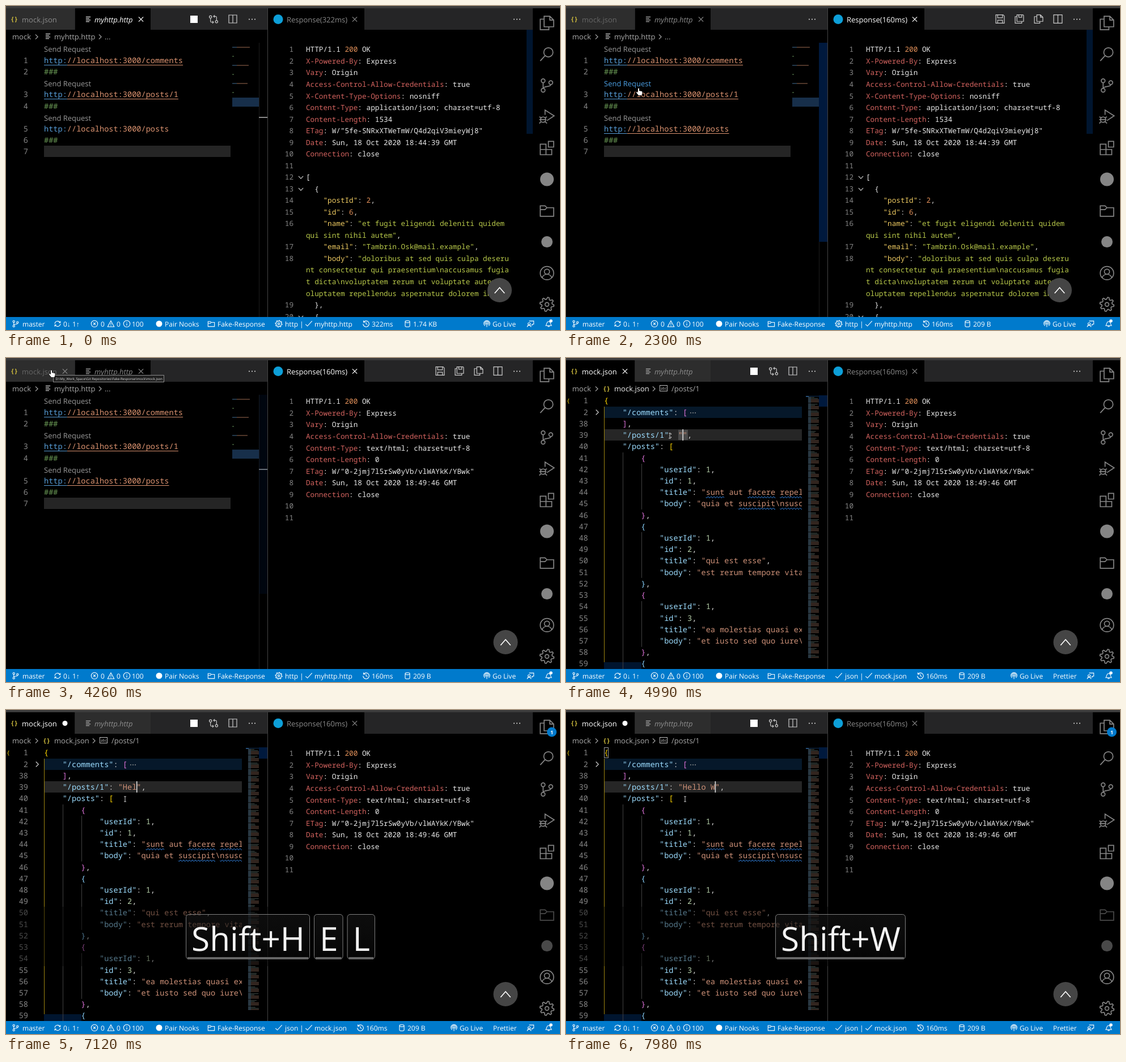
These frames come from a looping animation (977x573 px, 8 s). An HTML page with a canvas:

```html
<!DOCTYPE html>
<html lang="en">
<head>
<meta charset="utf-8">
<title>Mock server editor</title>
<style>
html, body { margin: 0; width: 100%; height: 100%; overflow: hidden; background: #000; }
canvas { display: block; }
</style>
</head>
<body>
<canvas id="stage" width="977" height="573"></canvas>
<script>
const ctx = document.getElementById('stage').getContext('2d');
const LOOP = 8000;
const UI = '"Open Sans", "Noto Sans", sans-serif';
const MONO = '"Noto Sans Mono", "DejaVu Sans Mono", monospace';
const LEFT = `13.62px ${MONO}`, RIGHT = `12.7px ${MONO}`;
const COL = 8.17, ROW = 20.22;
const T = { waiting: 1840, answered: 2260, shown: 2930, tip: 4180, opened: 4420, caret: 4880 };

const circle = (x, y, r) => `M${x - r} ${y}a${r} ${r} 0 1 0 ${2 * r} 0a${r} ${r} 0 1 0 ${-2 * r} 0`;
const gearPath = () => {
  let d = circle(8, 8, 2);
  for (let i = 0; i < 32; i++) {
    const a = (i + 0.5) * Math.PI / 16, r = i % 4 < 2 ? 7.4 : 5.4;
    d += `${i ? 'L' : 'M'}${8 + r * Math.cos(a)} ${8 + r * Math.sin(a)}`;
  }
  return d + 'Z';
};

// Outlines on a 16 x 16 grid
const ICONS = {
  files: 'M5 1h6l4 4v7H5zM11 1v4h4M5 4H1v11h9v-3',
  search: circle(9.5, 6, 4.8) + 'M6 9.5L1 15',
  branch: circle(4, 3, 2) + circle(4, 13, 2) + circle(12, 5, 2) + 'M4 5v6M12 7c0 3-7 1-8 4',
  debug: 'M6 6V1l9.5 6L8 12' + circle(4, 11, 2.8) + 'M0 8l2 1M0 11h7M0 15l2-2M8 8l-2 1M8 15l-2-2',
  blocks: 'M1 4h6v11H1zM1 9.5h12V15H1M9.5 1H15v6H9.5z',
  folder: 'M1 3h5l2 2h7v9H1zM1 7h5l2-2',
  person: circle(8, 8, 7) + circle(8, 6.5, 2.7) + 'M3 13c1-5 9-5 10 0',
  gear: gearPath(),
  sync: 'M2 8a6 6 0 0 1 11-3M14 8a6 6 0 0 1-11 3M14 2v3.5h-3.5M2 14v-3.5h3.5',
  error: circle(8, 8, 7) + 'M5.5 5.5l5 5M10.5 5.5l-5 5',
  warn: 'M8 1.5l7 13H1zM8 6v4M8 11.5v1.5',
  info: circle(8, 8, 7) + 'M8 7v5M8 4v1.5',
  check: 'M1 9l4 4 10-11',
  history: 'M3 4a6.5 6.5 0 1 1-1.5 4M2.5 1v3.5H6M8 4.5V8l3 2',
  store: 'M3 3.5v9c0 3 10 3 10 0v-9M3 3.5c0 3 10 3 10 0c0-3-10-3-10 0',
  cast: circle(8, 7, 1.5) + 'M8 9v6M4 12.5a6.5 6.5 0 1 1 8 0M5.5 10a4 4 0 1 1 5 0',
  feedback: circle(5, 8, 2.5) + 'M1 15c0-5 8-5 8 0M5 2h10v7h-2l-2 2V9',
  bell: 'M2 12c2-2 1-9 6-9s4 7 6 9zM6 12c0 3 4 3 4 0',
  split: 'M1 1h14v14H1zM8 1v14',
  save: 'M1 1h12l2 2v12H1zM4 1v5h8V1M4 15v-5h8v5',
  saveAll: 'M4 1h10l1 1v10H4zM7 1v4h5V1M4 4H1v11h11v-3',
  compare: circle(3, 4, 2) + circle(13, 12, 2) +
    'M3 6v5c0 2 1 2 5 2M6 11l2 2-2 2M13 10V5c0-2-1-2-5-2M10 1L8 3l2 2',
  lines: 'M2 2h12M2 6h9M2 10h12M2 14h9',
  close: 'M2 2l12 12M14 2L2 14',
  right: 'M5 2l6 6-6 6',
  down: 'M2 5l6 6 6-6',
  up: 'M1 12l7-8 7 8'
};
for (const name in ICONS) ICONS[name] = new Path2D(ICONS[name]);

const HAND = new Path2D('M-1-4q1-1 2 0v4l5 1q1 1 0 5l-1 2h-5l-4-5q0-2 3 0z');
const ARROW = new Path2D('M0 0v13l3-3 2 5 2-1-2-5h4z');
const BEAM = new Path2D('M-2-5h4M0-5V4M-2 4h4');

const clamp = v => Math.max(0, Math.min(1, v));

function rect(x, y, w, h, color) {
  ctx.fillStyle = color;
  ctx.fillRect(x, y, w, h);
}

function disc(x, y, r, color) {
  ctx.fillStyle = color;
  ctx.beginPath();
  ctx.arc(x, y, r, 0, 7);
  ctx.fill();
}

function text(s, x, y, color = '#fff', font = `13px ${UI}`, align = 'left') {
  ctx.font = font;
  ctx.fillStyle = color;
  ctx.textAlign = align;
  ctx.fillText(s, x, y);
  return ctx.measureText(s).width;
}

function icon(name, x, y, size, color = '#fff', weight = 1.2, turn = 0) {
  const k = size / 16;
  ctx.save();
  ctx.translate(x, y);
  ctx.rotate(turn);
  ctx.scale(k, k);
  ctx.translate(-8, -8);
  ctx.strokeStyle = color;
  ctx.lineWidth = weight / k;
  ctx.stroke(ICONS[name]);
  ctx.restore();
}

function dots(x, y, color = '#ccc', gap = 5, r = 1.1) {
  for (const i of [-1, 0, 1]) disc(x + i * gap, y, r, color);
}

function clipped(x, y, w, h, draw) {
  ctx.save();
  ctx.beginPath();
  ctx.rect(x, y, w, h);
  ctx.clip();
  draw();
  ctx.restore();
}

function runs(parts, x, y, font) {
  for (const [s, color] of parts) x += text(s, x, y, color, font);
}

function jsonParts(s, pal, bracket) {
  return [...s.matchAll(/"[^"]*"?|\d+|[{}\[\]]|[^"\d{}\[\]]+/g)].map(m => {
    const tok = m[0];
    if (tok[0] === '"') return [tok, s[m.index + tok.length] === ':' ? pal.key : pal.str];
    if (/\d/.test(tok)) return [tok, pal.num];
    return [tok, /[{}\[\]]/.test(tok) ? bracket : '#d4d4d4'];
  });
}

const BRIGHT = { key: '#f0cc62', str: '#b9ca4a', num: '#e3915a', head: '#d4635f', plain: '#eaeaea' };
const DARK = { key: '#9cdcfe', str: '#ce9178', num: '#b5cea8' };
const GOLD = '#ffd700', ORCHID = '#da70d6', SKY = '#87cefa';

const HEAD = ['X-Powered-By: Express', 'Vary: Origin', 'Access-Control-Allow-Credentials: true'];
const OLD_HEAD = [...HEAD, 'X-Content-Type-Options: nosniff', 'Content-Type: application/json; charset=utf-8',
  'Content-Length: 1534', 'ETag: W/"5fe-SNRxXTWeTmW/Q4d2qiV3mieyWj8"',
  'Date: Sun, 18 Oct 2020 18:44:39 GMT', 'Connection: close'];
const NEW_HEAD = [...HEAD, 'Content-Type: text/html; charset=utf-8', 'Content-Length: 0',
  'ETag: W/"0-2jmj7l5rSw0yVb/vlWAYkK/YBwk"', 'Date: Sun, 18 Oct 2020 18:49:46 GMT', 'Connection: close'];
// A leading ~ marks a wrapped string
const OLD_BODY = ['', '[', '  {', '    "postId": 2,', '    "id": 6,',
  '    "name": "et fugit eligendi deleniti quidem', '~qui sint nihil autem",',
  '    "email": "Tambrin.Osk@mail.example",',
  '    "body": "doloribus at sed quis culpa deseru',
  '~nt consectetur qui praesentium\\naccusamus fugia',
  '~t dicta\\nvoluptatem rerum ut voluptate autem v',
  '~oluptatem repellendus aspernatur dolorem in",', '  },', '  {'];

function response(fresh) {
  const y = i => Math.round(81.4 + 20.53 * i);
  const number = (n, i) => text(n, 507, y(i), '#858585', RIGHT, 'right');
  const head = fresh ? NEW_HEAD : OLD_HEAD;
  number(1, 0);
  runs([['HTTP/1.1 ', BRIGHT.plain], ['200', BRIGHT.num], [' OK', BRIGHT.plain]], 529, y(0), RIGHT);
  head.forEach((line, i) => {
    const cut = line.indexOf(':');
    number(i + 2, i + 1);
    runs([[line.slice(0, cut), BRIGHT.head], [line.slice(cut), BRIGHT.plain]], 529, y(i + 1), RIGHT);
  });
  let n = head.length + 2;
  (fresh ? ['', ''] : OLD_BODY).forEach((line, k) => {
    const i = head.length + 1 + k;
    if (line[0] === '~') {
      const comma = line.endsWith(',');
      runs([[line.slice(1, comma ? -1 : undefined), BRIGHT.str], [comma ? ',' : '', BRIGHT.plain]],
        529, y(i), RIGHT);
      return;
    }
    number(n++, i);
    runs(jsonParts(line, BRIGHT, BRIGHT.plain), 529, y(i), RIGHT);
    if (/[\[{]$/.test(line)) icon('down', 520, y(i) - 4, 11, '#ccc');
  });
  if (!fresh) rect(918, 42, 11, 184, '#00152f');
  const x = fresh ? 881 : 870.5;
  disc(x, 502.5, 21.5, '#454545');
  icon('up', x, 503, 20, '#fff', 1.6);
}

function record(id, title, body, color) {
  return [['        {', color], ['            "userId": 1,'], [`            "id": ${id},`],
    [`            "title": "${title}`], [`            "body": "${body}`], ['        },', color]];
}
const JSON_LINES = [['{', GOLD], ['    "/comments": [', ORCHID], ['    ],', ORCHID], null, ['    "/posts": [', GOLD],
  ...record(1, 'sunt aut facere repellat', 'quia et suscipit\\nsuscipit', ORCHID),
  ...record(2, 'qui est esse",', 'est rerum tempore vitae', SKY),
  ...record(3, 'ea molestias quasi exer', 'et iusto sed quo iure\\nvol', ORCHID),
  ['        {', SKY]];

function squiggle(col, len, row) {
  const x0 = 67 + col * COL, y = 84.5 + row * ROW;
  ctx.strokeStyle = '#3794ff';
  ctx.lineWidth = 1;
  ctx.beginPath();
  for (let x = 0; x < len * COL; x++) ctx.lineTo(x0 + x, y + Math.sin(x * 1.2) * 1.2);
  ctx.stroke();
}

function jsonMinimap() {
  const noise = n => { const v = Math.sin(n * 91.7) * 4375.5; return v - Math.floor(v); };
  for (let i = 0; i < 231; i++) {
    const y = 69 + i * 2, kind = i % 6;
    rect(427, y, 5, 1.3, kind === 5 ? '#26323a' : '#3f5666');
    if (kind < 5) rect(432, y, kind < 2 ? 6 + noise(i) * 8 : 14, 1.3, kind < 2 ? '#333c38' : '#4c382f');
  }
  rect(423, 67, 5, 2, '#264f78');
  rect(428, 67, 18, 1, '#0c2c52');
}

function jsonEditor(t, typed) {
  const base = i => Math.round(80.4 + i * ROW), top = i => Math.round(65.7 + i * ROW);
  rect(67, top(1), 349, 20, '#06182a');
  rect(67, top(3), 349, 20, '#262626');
  if (!typed) {
    rect(198, top(3) + 1, 8, 18, '#4a4a4a');
    rect(207, top(3) + 1, 8, 18, '#4a4a4a');
  }
  rect(67, 538, 66, 12, '#00152f');
  rect(67, 86, 1, 452, '#9c8410');
  rect(100, top(5), 1, 384, '#404040');
  for (const r of [6, 12, 18]) rect(133, top(r), 1, 4 * ROW, '#404040');
  if (t >= 7400) {
    ctx.strokeStyle = '#999';
    ctx.lineWidth = 1;
    ctx.strokeRect(67.5, 66.5, 7, 18);
  }
  text('{', 1, 79, GOLD, `10px ${MONO}`);
  clipped(0, 64, 416, 486, () => {
    JSON_LINES.forEach((line, i) => {
      text(i < 2 ? i + 1 : i + 36, 39, base(i), '#858585', LEFT, 'right');
      const [s, color] = line || [`    "/posts/1": "${typed}",`];
      runs(jsonParts(s, DARK, color), 67, base(i), LEFT);
    });
    squiggle(22, 4, 8);
    squiggle(31, 6, 8);
    squiggle(38, 8, 8);
    squiggle(29, 8, 9);
    squiggle(38, 8, 9);
  });
  dots(224, 97, '#999', 4, 0.9);
  icon('right', 55, 96, 12, '#ccc');
  const caretOn = t >= T.caret && (t < 5420 || t >= 5900);
  if (caretOn) rect(66.5 + (17 + typed.length) * COL, top(3), 1.6, 20, '#ddd');
  jsonMinimap();
  rect(446, 66, 15, 20, '#00193d');
}

function httpEditor(t, pointer) {
  const y = i => Math.round(80.4 + i * ROW);
  const hovered = t >= 1350 && t < 3460;
  rect(67, 247, 329, 20, '#252525');
  ['comments', 'posts/1', 'posts'].forEach((path, i) => {
    const r = i * 3, rest = `//localhost:3000/${path}`;
    text('Send Request', 67, y(r) + 1, hovered && i === 1 ? '#4b9fe3' : '#999');
    text(2 * i + 1, 39, y(r + 1), '#858585', LEFT, 'right');
    text(2 * i + 2, 39, y(r + 2), '#858585', LEFT, 'right');
    runs([['http:', '#569cd6'], [rest, '#dc9370']], 67, y(r + 1), LEFT);
    text('###', 67, y(r + 2), '#6a9955', LEFT);
    if (i < 2 || t >= T.answered) {
      rect(67, y(r + 1) + 3, 5 * COL, 1, '#569cd6');
      rect(67 + 5 * COL, y(r + 1) + 3, rest.length * COL, 1, '#dc9370');
    }
    rect(399, 72 + 32 * i, 8, 2, '#22384a');
    rect(407, 72 + 32 * i, 23 - i * 2, 2, '#4f3629');
    rect(399, 88 + 32 * i, 3, 2, '#334a2d');
  });
  text(7, 39, y(9), '#858585', LEFT, 'right');
  rect(399, 162, 47, 16, '#172f4a');
  rect(446, 65, 1, 485, '#1c1c1c');
  rect(446, 196, 15, 2, '#8a8a8a');
  const inside = pointer && pointer.x < 461;
  if (inside) {
    ctx.globalAlpha = clamp(1 - (t - T.tip) / 107);
    rect(446, 65, 15, 352, '#00193d');
    ctx.globalAlpha = 1;
  }
}

function tabs(t, json, typed) {
  const away = t >= T.answered && !json;
  rect(0, 0, 977, 4, '#3c3c3c');
  rect(0, 4, 929, 38, '#252526');
  rect(0, 4, 121, 38, json ? '#000' : '#2d2d2d');
  rect(122, 4, 133, 38, json ? '#2d2d2d' : '#000');
  rect(462, 4, 170, 38, '#000');
  rect(461, 4, 1, 546, '#444');
  text('{}', 8, 27, '#cbb93c', `bold 11px ${MONO}`);
  text('mock.json', 28, 28.5, json ? '#fff' : away ? '#666' : '#8b8b8b');
  if (typed) disc(104, 23.5, 4.5, '#fff');
  else if (json || t >= 3950) icon('close', 104, 23.5, 11, json ? '#fff' : '#888');
  const grey = json || away;
  icon('lines', 145, 23.5, 11, grey ? '#aaa' : '#ddd');
  text('myhttp.http', 156, 28.5, grey ? '#8b8b8b' : '#fff', `italic 13px ${UI}`);
  if (!json) icon('close', 238, 23.5, 11, away ? '#888' : '#fff');
  if (!away) {
    rect(325, 17, 13, 13, '#fff');
    icon('compare', 366, 23.5, 17, '#ccc');
    icon('split', 400, 23, 16, '#ccc');
  }
  dots(434, 23.5);
  disc(480, 23.5, 8.5, '#0d9fd8');
  text(`Response(${t < T.answered ? 322 : 160}ms)`, 495, 28.5, away ? '#fff' : '#8b8b8b');
  icon('close', 615, 23.5, 11, away ? '#fff' : '#888');
  if (away) ['save', 'saveAll', 'files', 'split'].forEach((n, i) => icon(n, 765.5 + i * 34, 23, 17, '#ccc'));
  dots(901, 23.5);

  text('mock', 11, 59, '#a9a9a9');
  icon('right', 54, 54.5, 11, '#a9a9a9');
  if (json) {
    text('{}', 65, 58, '#cbb93c', `bold 11px ${MONO}`);
    text('mock.json', 85, 59, t > 4680 && t < 5060 ? '#eee' : '#a9a9a9');
    icon('right', 155, 54.5, 11, '#a9a9a9');
    ctx.strokeStyle = '#bbb';
    ctx.lineWidth = 1;
    ctx.strokeRect(165.5, 48.5, 13, 10);
    text('abc', 167, 56, '#ccc', `6.5px ${UI}`);
    text('/posts/1', 186, 59, '#a9a9a9');
  } else {
    icon('lines', 74, 53.5, 11, '#ccc');
    text('myhttp.http', 85, 59, '#a9a9a9');
    icon('right', 166, 54.5, 11, '#a9a9a9');
    text('...', 174, 59, '#a9a9a9');
  }
}

function activityBar(typed) {
  const names = ['files', 'search', 'branch', 'debug', 'blocks', '', 'folder', '', 'person', 'gear'];
  rect(929, 4, 48, 546, '#000');
  names.forEach((name, i) => {
    const y = 30 + i * 55.3;
    if (name) icon(name, 954, y, 27, '#858585', 1.7);
    else disc(954, y, i === 5 ? 12 : 10, '#858585');
  });
  if (typed) {
    disc(962.5, 39, 8.5, '#007acc');
    text('1', 962.5, 42.5, '#fff', `bold 9px ${UI}`, 'center');
  }
}

function statusBar(t, json) {
  const label = (s, x) => text(s, x, 567, '#fff', `12px ${UI}`);
  const mark = (name, x, turn) => icon(name, x, 562, 13, '#fff', 1.1, turn);
  rect(0, 550, 977, 23, '#007acc');
  mark('branch', 17); label('master', 29);
  mark('sync', 91); label('0↓ 1↑', 101);
  mark('error', 156); label('0', 167);
  mark('warn', 185); label('0', 195);
  mark('info', 213); label('100', 222);
  disc(270, 562, 5.5, '#fff'); label('Pair Nooks', 280);
  mark('folder', 362); label('Fake-Response', 373);
  mark(json ? 'check' : 'gear', 481);
  label(json ? 'json' : 'http', 492); label('|', 518);
  mark('check', 534); label(json ? 'mock.json' : 'myhttp.http', 544);
  const x = json ? -10 : 0;
  if (t >= T.waiting && t < T.answered) {
    mark('sync', 635, t / 160); label('Waiting', 645);
  } else {
    const done = t >= T.answered;
    mark('history', 635 + x); label(done ? '160ms' : '322ms', 645 + x);
    mark('store', 708 + x); label(done ? '209 B' : '1.74 KB', 718 + x);
  }
  const live = json ? 784 : 842;
  mark('cast', live + 6); label('Go Live', live + 16);
  if (json) label('Prettier', 859);
  mark('feedback', 925); mark('bell', 957);
  disc(961, 557, 2.8, '#fff');
}

// Time, keys on show, text typed so far
const STROKES = [[6290, 'Shift', ''], [6460, 'Shift+H', 'H'], [6720, 'Shift+H E', 'He'], [7120, 'Shift+H E L', 'Hel'],
  [7280, 'Shift+H E L L', 'Hell'], [7440, 'Shift+H E L L O', 'Hello'], [7670, 'Shift+H E L L O Space', 'Hello '],
  [7820, 'Shift', 'Hello '], [7980, 'Shift+W', 'Hello W']];

function keyOverlay(t, keys) {
  const font = `58.5px ${UI}`, gap = 7;
  ctx.font = font;
  const caps = keys.split(' ').map(s => ({ s, w: ctx.measureText(s).width + 19 }));
  let x = 484 - (caps.reduce((sum, c) => sum + c.w + gap, -gap)) / 2;
  ctx.save();
  ctx.globalAlpha = clamp((t - 6200) / 300);
  rect(0, 348, 977, 105, 'rgba(0,0,0,.45)');
  const fill = ctx.createLinearGradient(0, 361, 0, 441);
  fill.addColorStop(0, 'rgba(32,32,32,.4)');
  fill.addColorStop(1, 'rgba(8,8,8,.6)');
  for (const { s, w } of caps) {
    ctx.beginPath();
    ctx.roundRect(x + 0.5, 361.5, w - 1, 79, 5);
    ctx.fillStyle = fill;
    ctx.fill();
    ctx.strokeStyle = '#808080';
    ctx.lineWidth = 1;
    ctx.stroke();
    rect(x + 3, 437, w - 6, 4, '#666');
    text(s, x + 10, 426, '#f4f4f4', font);
    x += w + gap;
  }
  ctx.restore();
}

const PATH = [[360, 962, 572], [1130, 160, 152], [1280, 160, 152], [1430, 128, 150], [3390, 128, 150],
  [3650, 158, 100], [4030, 80, 26], [4500, 80, 26], [4990, 183, 138], [5530, 210, 158]];

function pointerAt(t) {
  if (t <= PATH[0][0]) return null;
  const next = PATH.findIndex(p => p[0] > t);
  if (next < 0) return { x: 210, y: 158 };
  const [t0, x0, y0] = PATH[next - 1], [t1, x1, y1] = PATH[next];
  const k = (t - t0) / (t1 - t0), e = k * k * (3 - 2 * k);
  return { x: x0 + (x1 - x0) * e, y: y0 + (y1 - y0) * e };
}

function drawPointer(t, p, json) {
  const onLink = !json && t > 1280 && t < 3460;
  ctx.save();
  ctx.translate(p.x, p.y);
  ctx.lineWidth = 1;
  if (p.x < 461 && p.y > 65 && !onLink) {
    ctx.strokeStyle = '#ccc';
    ctx.stroke(BEAM);
  } else {
    const shape = onLink || p.y < 65 ? HAND : ARROW;
    ctx.strokeStyle = '#000';
    ctx.fillStyle = '#fff';
    ctx.stroke(shape);
    ctx.fill(shape);
  }
  ctx.restore();
}

function tooltip() {
  rect(83, 30, 196, 13, '#8a8a8a');
  rect(84, 31, 194, 11, '#202020');
  text('D:\\My_Work_Space\\Git Repositories\\Fake-Response\\mock\\mock.json', 87.5, 38.7, '#ddd', `5.9px ${UI}`);
}

function draw(t) {
  const json = t >= T.opened;
  const pointer = pointerAt(t);
  const [, keys, typed] = STROKES.findLast(s => s[0] <= t) || [0, '', ''];
  ctx.textRendering = 'geometricPrecision';
  rect(0, 0, 977, 573, '#000');
  if (json) jsonEditor(t, typed);
  else httpEditor(t, pointer);
  clipped(462, 42, 467, 508, () => response(t >= T.shown));
  tabs(t, json, typed);
  activityBar(typed);
  statusBar(t, json);
  if (t >= T.tip && !json) tooltip();
  if (pointer) drawPointer(t, pointer, json);
  if (keys) keyOverlay(t, keys);
}

function tick() {
  draw(performance.now() % LOOP);
  requestAnimationFrame(tick);
}
tick();
</script>
</body>
</html>
```
